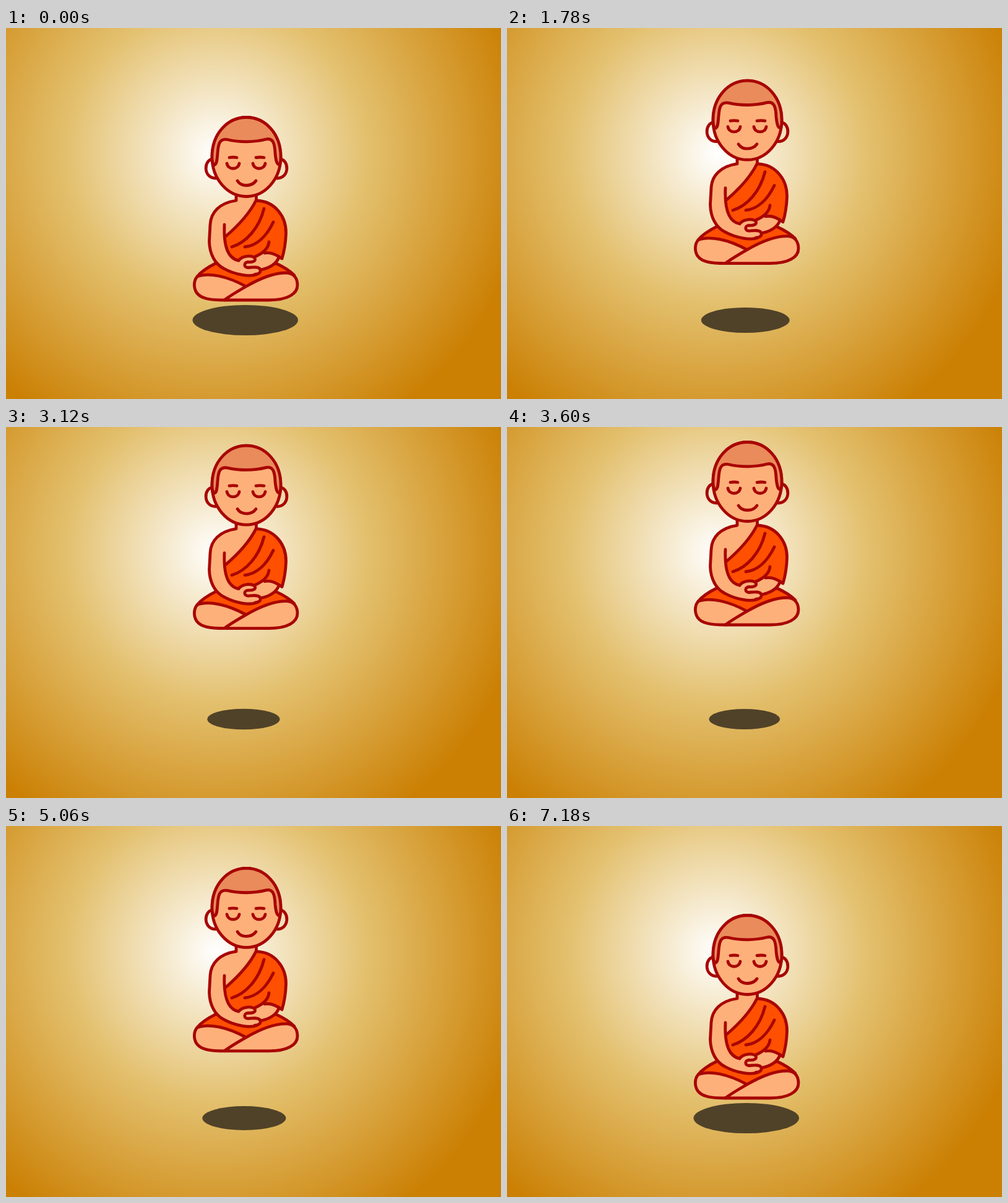
Animation, 800 px wide and 600 px high, one loop 7200 ms. Source, as an HTML page:

```html
<!DOCTYPE html>
<html lang="en">
<head>
<meta charset="utf-8">
<title>Levitating monk</title>
<style>
  html, body { margin: 0; width: 100%; height: 100%; overflow: hidden; background: #cb8004; }
  svg { display: block; width: 100vw; height: 100vh; }
  .line { fill: none; }
  .skin { fill: #feb07a; }
  .robe { fill: #ff4f00; }
  .hair { fill: #ea8b5b; }
  .plain { stroke: none; }
</style>
</head>
<body>
<svg viewBox="0 0 800 600">
  <defs>
    <radialGradient id="glow" gradientUnits="userSpaceOnUse" cx="340" cy="203" r="505">
      <stop offset="0" stop-color="#fff"/>
      <stop offset=".48" stop-color="#e3c06e"/>
      <stop offset="1" stop-color="#cb8004"/>
    </radialGradient>
  </defs>
  <rect width="800" height="600" fill="url(#glow)"/>
  <ellipse id="shadow" cy="472.5" fill="#504228"/>

  <g id="monk" stroke="#a80505" stroke-width="4.8" stroke-linecap="round" stroke-linejoin="round">
    <!-- lap and legs -->
    <path class="robe" d="M309 402C316 393 326 387 340 380L437 381C448 386 458 392 466 400L388 418Z"/>
    <path class="skin" d="M309 402C327 395 357 401 388 418L353 440C330 440 315 438 308 428C303 420 303 409 309 402Z"/>
    <path class="skin" d="M353 440C362 433 374 426 388 418C412 404 436 395.500 454 396C467 397 471 407 471 416C471 430 455 440 425 440Z"/>

    <!-- torso -->
    <path class="skin plain" d="M372 262V279C345 283 331 298 330 318L328.5 345C329 366 338 382 352 389C370 399 395 403 405 399L412 391C426 388 437 380 441 370L446 340L404 279V262Z"/>
    <path class="robe plain" d="M404 279C435 280 453 305 452.5 332C452 347 450 360 446 373C438 367 428 362 418 364L402 373C396 367 383 368 376 376C364 373 357 360 354 337C376 318 394 299 404 279Z"/>
    <path class="line" d="M372 270V279C345 283 331 298 330 318L328.5 345C329 366 338 382 352 389C370 399 394 403 405 398.5"/>
    <path class="line" d="M404.5 268V279C435 280 453 305 452.5 332C452 347 450 360 446 373C438 367 428 362 418 364"/>
    <path class="line" d="M404 279C394 299 376 319 355 337M353 318C352 340 354 372 376 376"/>
    <path class="line" d="M417 292C409 324 388 347 365 354M432 314C421 337 405 352 386 354M425 346C424 357 416 364 402 370"/>
    <path class="line" d="M441 371C437 381 426 388 412 391"/>
    <path class="skin" d="M376 376C382 368 397 367 402 372C405 377 398 379 391 378.5C384 379 384 387 391 387.5C398 387 409 385 411 391C412 396 408 398 402 398.5"/>

    <!-- head -->
    <path class="line" d="M335 212C319 212 318 243 339 243M442 212C458 212 459 243 438 243"/>
    <ellipse class="skin" cx="388.5" cy="208.5" rx="55.5" ry="64"/>
    <path class="hair" d="M333 208C333 171 358 144.5 388.5 144.5S444 171 444 208C444 214 444 220 441 221C437 220 436 212 435 203C434.5 188 432 177 420 180C401 185 377 185 358 180.500C345 178 343 188 342 202C341 213 341 220 337 221.5C333 220 333 214 333 208Z"/>
    <path class="line" d="M361 209.5Q367 208.5 373 209.5M404 209.5Q411 208.5 417 209.5"/>
    <path class="line" d="M357 219C359 230 375 230 377 219M399 219C401 230 417 230 419 219"/>
    <path class="line" d="M374 247C380 257 397 257 404 247"/>
  </g>
</svg>
<script>
  const LOOP = 7200;
  const TRAVEL = 7180; // the monk rests on the ground for the last moment of the loop
  const RISE = 120;
  const monk = document.getElementById("monk");
  const shadow = document.getElementById("shadow");
  const smooth = p => p * p * (3 - 2 * p);

  function draw(time) {
    const phase = Math.min(1, (time % LOOP) / TRAVEL);
    const lift = smooth(1 - Math.abs(1 - 2 * phase));
    const scale = 1 - 0.328 * lift;
    monk.setAttribute("transform", `translate(0 ${-RISE * lift})`);
    shadow.setAttribute("cx", 386.75 - 3 * lift);
    shadow.setAttribute("rx", 85.25 * scale);
    shadow.setAttribute("ry", 24.5 * scale);
  }

  const start = performance.now();
  function tick() {
    draw(performance.now() - start);
    requestAnimationFrame(tick);
  }
  tick();
</script>
</body>
</html>
```
